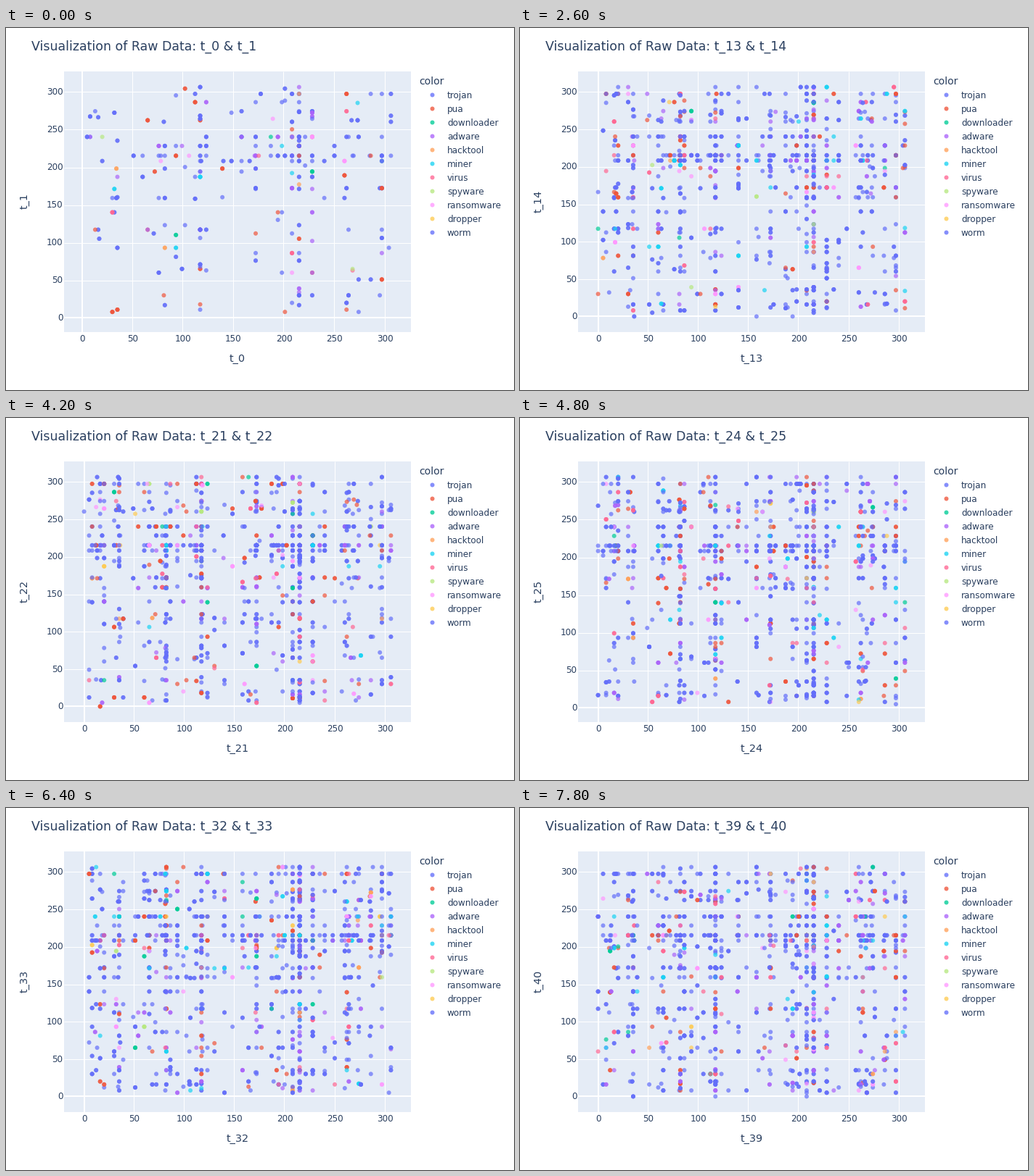
A matplotlib script for the animation above (8000 ms loop, 700x500 px).

```python
import math

import numpy as np
import matplotlib.pyplot as plt
from matplotlib.animation import FuncAnimation
from matplotlib.colors import to_rgba
from matplotlib.patches import Rectangle

W, H, DPI = 700, 500, 100
STEPS, INTERVAL = 40, 200
LEFT, RIGHT, TOP, BOTTOM = 80, 558, 60, 420
PAD_X, PAD_Y = 27.6, 21.6
MAX_ID = 306
INK, PLOT_BG = "#2a3f5f", "#e5ecf6"
PX = 72 / DPI
DOT = (6 * PX) ** 2

# name, colour, share of the samples
CLASSES = [
    ("trojan", "#636efa", 0.42), ("pua", "#ef553b", 0.10),
    ("downloader", "#00cc96", 0.013), ("adware", "#ab63fa", 0.09),
    ("hacktool", "#ffa15a", 0.006), ("miner", "#19d3f3", 0.035),
    ("virus", "#ff6692", 0.045), ("spyware", "#b6e880", 0.006),
    ("ransomware", "#ff97ff", 0.027), ("dropper", "#fecb52", 0.006),
    ("worm", "#636efa", 0.252),
]
NAMES, HUES, SHARES = zip(*CLASSES)
COLORS = np.array([to_rgba(c, 0.7) for c in HUES])

# call ids that form the clear columns and rows, strongest first
TOP_COLS = (215, 117, 208, 82, 228, 172, 35, 297)
TOP_ROWS = (215, 208, 240, 297, 228, 172, 117, 159)
COMMON = (8, 16, 20, 30, 35, 60, 65, 81, 86, 93, 112, 123, 140, 158, 171,
          187, 194, 198, 240, 260, 262, 264, 274, 286, 297, 306)


def id_weights(top):
    rare = np.random.default_rng(5).choice(MAX_ID + 1, 60, replace=False)
    w = np.zeros(MAX_ID + 1)
    w[rare] = 1
    w[list(COMMON)] = 4
    w[list(top)] = 32 / (1 + 0.5 * np.arange(len(top)))
    return w


COL_W, ROW_W = id_weights(TOP_COLS), id_weights(TOP_ROWS)


def low(t):
    """Smallest call id at position t."""
    return 2 if t in (0, 1, 25) else 0


def to_x(v, lo):
    return LEFT + PAD_X + (v - lo) * (RIGHT - LEFT - 2 * PAD_X) / (MAX_ID - lo)


def to_y(v, lo):
    return BOTTOM - PAD_Y - (v - lo) * (BOTTOM - TOP - 2 * PAD_Y) / (MAX_ID - lo)


def draw_ids(rng, w, lo, n):
    w = np.where(np.arange(w.size) < lo, 0, w)
    return rng.choice(w.size, n, p=w / w.sum())


def step_points(i):
    """Dot places and colours; later positions hold more distinct pairs."""
    rng = np.random.default_rng(100 + i)
    n = int(250 + 190 * math.log1p(i))
    x = to_x(draw_ids(rng, COL_W, low(i), n), low(i))
    y = to_y(draw_ids(rng, ROW_W, low(i + 1), n), low(i + 1))
    kind = rng.choice(len(CLASSES), n, p=np.array(SHARES) / sum(SHARES))
    # repeated samples stack up into more solid dots
    copies = rng.choice([1, 2, 3], n, p=[0.5, 0.25, 0.25])
    pick = np.repeat(np.argsort(kind, kind="stable"), copies)
    return np.column_stack([x, y])[pick], COLORS[kind[pick]]


POINTS = [step_points(i) for i in range(STEPS)]

plt.rcParams["font.family"] = "DejaVu Sans"
fig = plt.figure(figsize=(W / DPI, H / DPI), dpi=DPI, facecolor="white")
ax = fig.add_axes([0, 0, 1, 1])
ax.set_xlim(0, W)
ax.set_ylim(H, 0)
ax.axis("off")


def label(x, y, text, size, va="baseline", **kw):
    return ax.text(x, y, text, fontsize=size * PX, color=INK, va=va, **kw)


ax.add_patch(Rectangle((LEFT, TOP), RIGHT - LEFT, BOTTOM - TOP,
                       facecolor=PLOT_BG, linewidth=0, zorder=0))

grid = []
for v in range(0, 301, 50):
    style = dict(color="white", lw=(1 if v else 2) * PX,
                 zorder=1 if v else 2, solid_capstyle="butt")
    vline, = ax.plot([0, 0], [TOP, BOTTOM], **style)
    hline, = ax.plot([LEFT, RIGHT], [0, 0], **style)
    xt = label(0, 433, str(v), 12, ha="center")
    yt = label(78.6, 0, str(v), 12, ha="right")
    grid.append((v, vline, hline, xt, yt))

title = label(35, 30.3, "", 17.35)
x_title = label(319, 461, "", 14.4, ha="center")
y_title = label(33, 239.5, "", 14.4, va="center", ha="right", rotation=90)

label(569.5, 78, "color", 14)
rows = 92.5 + 19 * np.arange(len(CLASSES))
ax.scatter(np.full(len(CLASSES), 587.5), rows, s=DOT, c=HUES, alpha=0.78,
           linewidths=0)
for name, y in zip(NAMES, rows):
    label(608, y + 4.5, name, 12)

dots = ax.scatter([], [], s=DOT, linewidths=0, zorder=3)


def place_grid(lo_x, lo_y):
    for v, vline, hline, xt, yt in grid:
        x, y = to_x(v, lo_x), to_y(v, lo_y)
        xt.set_x(x)
        yt.set_y(y + 4)
        # thin lines fill the pixel they fall in
        if v:
            x, y = math.floor(x), math.floor(y) + 1
        vline.set_xdata([x, x])
        hline.set_ydata([y, y])


def update(i):
    a, b = f"t_{i}", f"t_{i + 1}"
    title.set_text(f"Visualization of Raw Data: {a} & {b}")
    x_title.set_text(a)
    y_title.set_text(b)
    place_grid(low(i), low(i + 1))
    xy, colors = POINTS[i]
    dots.set_offsets(xy)
    dots.set_facecolors(colors)
    return []


anim = FuncAnimation(fig, update, frames=STEPS, interval=INTERVAL,
                     init_func=lambda: update(0), repeat=True,
                     repeat_delay=0, blit=False)
plt.show()
```
